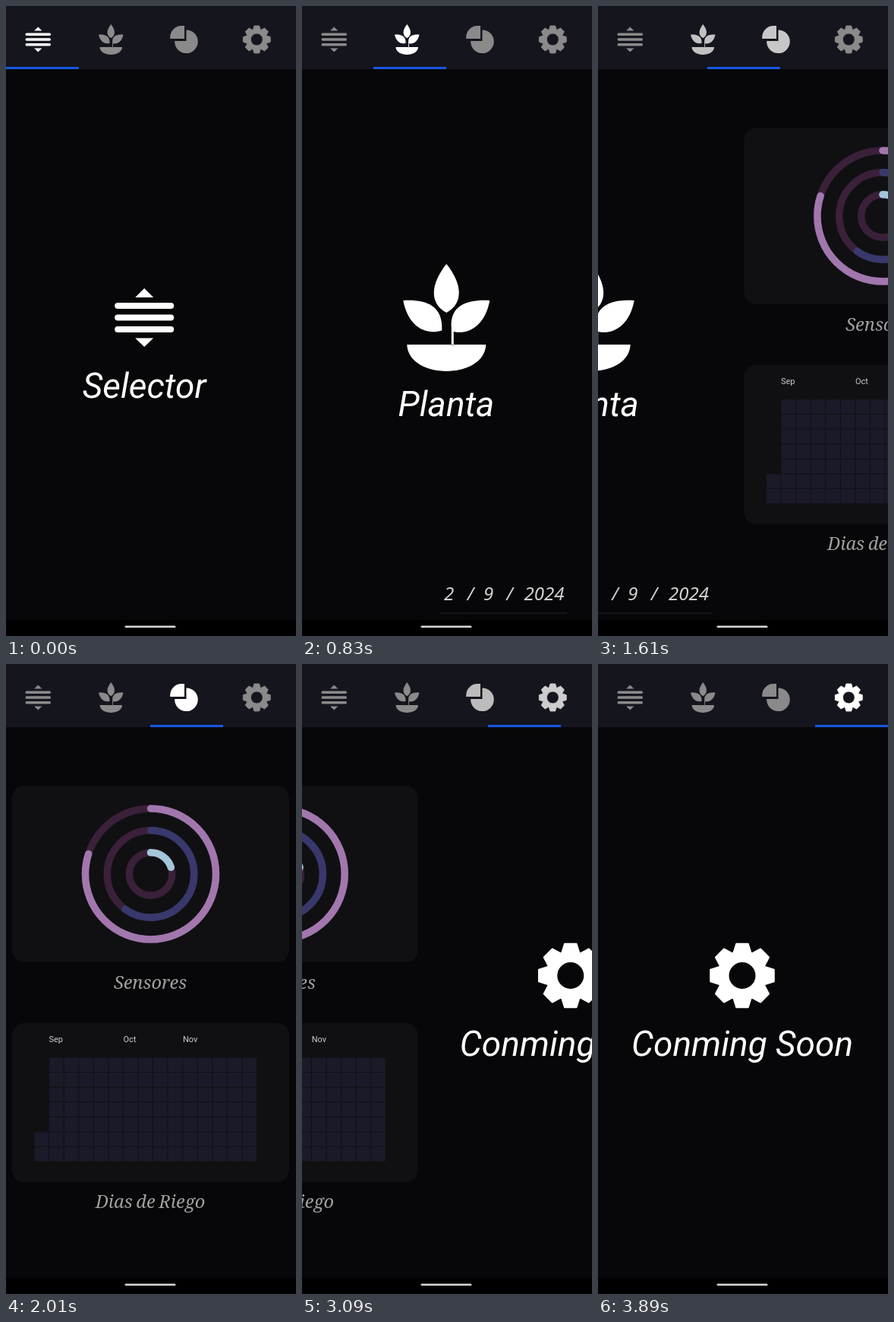
Animation of 382 by 828 pixels, one loop 3920 ms. Source, as an HTML page with a canvas:

```html
<!DOCTYPE html>
<html lang="es">
<head>
<meta charset="utf-8">
<title>Planta</title>
<style>
  html, body { margin: 0; width: 100%; height: 100%; overflow: hidden; background: #000; }
  canvas { display: block; width: 382px; height: 828px; }
</style>
</head>
<body>
<canvas id="stage"></canvas>
<script>
const W = 382, H = 828, LOOP = 3920;
const STRIDE = 384, TAB = 96, LEFT = -2, MID = 190;
const SWIPES = [-17, 1430.5, 2894], SWIPE_MS = 500;
const WHITE = '#fff', CARD = '#101013';
const MUTED = 138, ACTIVE = 255;

const canvas = document.getElementById('stage');
const ctx = canvas.getContext('2d');
const dpr = window.devicePixelRatio || 1;
canvas.width = W * dpr;
canvas.height = H * dpr;

const clamp = v => Math.max(0, Math.min(1, v));

// A flick: quick pick-up, then a long settle.
const flick = u => 1 - Math.pow(1 - Math.pow(clamp(u), 1.5), 3);
const pageAt = t => SWIPES.reduce((p, s) => p + flick((t - s) / SWIPE_MS), 0);

function rect(x, y, w, h, color, r = 0) {
  ctx.fillStyle = color;
  ctx.beginPath();
  ctx.roundRect(x, y, w, h, r);
  ctx.fill();
}

function text(str, x, y, font, color, align = 'center') {
  ctx.font = font;
  ctx.fillStyle = color;
  ctx.textAlign = align;
  ctx.fillText(str, x, y);
}

function icon(draw, x, y, scale, color) {
  ctx.save();
  ctx.translate(x, y);
  ctx.scale(scale, scale);
  ctx.fillStyle = ctx.strokeStyle = color;
  draw();
  ctx.restore();
}

function selector() {
  for (const y of [-15.6, 0, 15.6]) rect(-39, y - 4, 78, 8, ctx.fillStyle, 4);
  ctx.fill(new Path2D('M0-38.5L12-26.5H-12ZM0 38.5L12 27H-12Z'));
}

const PLANT = new Path2D(
  'M0-70.5C22-43 22-18 0-6.5C-22-18-22-43 0-70.5Z' +
  'M-57-22.5C-30-24-4-18-6 17C-29 24-51 10-57-22.5Z' +
  'M57-22.5C30-24 4-18 6.5 14V36H9.5V18.5C30 23 51 10 57-22.5Z' +
  'M-52 35.5H52C50 82-50 82-52 35.5Z');

const PIE = new Path2D(
  'M.5-18V-1H-18.3V-3A15 15 0 0 1-3.3-18Z' +
  'M3-12.5A15.3 15.3 0 1 1-12.3 2H3Z');

function gear() {
  ctx.beginPath();
  for (let k = 0; k < 8; k++) {
    for (const [deg, r] of [[-21, 32], [-10.5, 42.5], [10.5, 42.5], [21, 32]]) {
      const a = (k * 45 + deg - 90) * Math.PI / 180;
      ctx.lineTo(r * Math.cos(a), r * Math.sin(a));
    }
  }
  ctx.closePath();
  ctx.moveTo(18.5, 0);
  ctx.arc(0, 0, 18.5, 0, 2 * Math.PI, true);
  ctx.lineWidth = 2;
  ctx.lineJoin = 'round';
  ctx.fill();
  ctx.stroke();
}

const plant = () => ctx.fill(PLANT);
const pie = () => ctx.fill(PIE);

const title = (str, y) => text(str, MID, y, 'italic 46px Roboto, sans-serif', WHITE);

function caption(str, y) {
  ctx.wordSpacing = '-1.5px';
  text(str, MID, y, 'italic 23.6px "Noto Serif", serif', '#a0a0a0');
  ctx.wordSpacing = '0px';
}

function ring(r, share, color) {
  const top = -Math.PI / 2;
  const arc = (part, c) => {
    ctx.strokeStyle = c;
    ctx.beginPath();
    ctx.arc(190.5, 276, r, top, top + part * 2 * Math.PI);
    ctx.stroke();
  };
  ctx.lineWidth = 9.5;
  ctx.lineCap = 'round';
  arc(1, '#3a2038');
  arc(share, color);
}

function calendar() {
  const step = 19.57;
  for (let c = 0; c < 15; c++) {
    for (let r = c ? 0 : 5; r < 7; r++) {
      rect(37.5 + c * step, 517.5 + r * step, step - 1, step - 1, '#1b1a29');
    }
  }
  [['Sep', 56.5], ['Oct', 154.5], ['Nov', 233]].forEach(([m, x]) =>
    text(m, x, 497, '11px Roboto, sans-serif', '#cccccc', 'left'));
}

const pages = [
  () => {
    icon(selector, MID, 409.5, 1, WHITE);
    title('Selector', 515);
  },
  () => {
    icon(plant, 190.3, 409.5, 1, WHITE);
    title('Planta', 539);
    [['2', 193.5], ['/', 222], ['9', 245.5], ['/', 273.5], ['2024', 319]].forEach(([s, x]) =>
      text(s, x, 781, 'italic 500 24px "Noto Sans", sans-serif', '#d2d2d2'));
    rect(181, 797.5, 168, 1, '#25252b');
  },
  () => {
    rect(8, 160, 365, 232, CARD, 16);
    ring(86, 0.8, '#a177ad');
    ring(57.2, 0.6, '#38386c');
    ring(28.2, 0.2, '#a4c6da');
    caption('Sensores', 427);
    rect(8, 472, 365, 209, CARD, 16);
    calendar();
    caption('Dias de Riego', 715);
  },
  () => {
    icon(gear, MID, 409.5, 1, WHITE);
    title('Conming Soon', 515);
  }
];

const tabs = [
  [selector, 42.3, 44, 0.43],
  [plant, 138.3, 44, 0.285],
  [pie, 234.5, 44, 1],
  [gear, 330.3, 44, 0.43]
];

function draw(t) {
  const p = pageAt(t);
  ctx.setTransform(dpr, 0, 0, dpr, 0, 0);
  rect(0, 0, W, H, '#070709');

  pages.forEach((page, i) => {
    const x = (i - p) * STRIDE;
    if (Math.abs(x) >= STRIDE) return;
    ctx.save();
    ctx.translate(x, 0);
    page();
    ctx.restore();
  });

  rect(0, 0, W, 83, '#15151e');
  tabs.forEach(([shape, x, y, scale], i) => {
    const w = clamp(1 - Math.abs(p - i));
    const v = Math.round(MUTED + (ACTIVE - MUTED) * w);
    icon(shape, x, y, scale, `rgb(${v}, ${v}, ${v})`);
  });
  rect(LEFT + p * TAB, 80, TAB, 3, '#1757e2');

  rect(0, 807, W, 21, '#000');
  rect(156.5, 814.5, 67, 2.5, '#d8d8d8', 1.2);
}

const start = performance.now();
function tick() {
  draw((performance.now() - start) % LOOP);
  requestAnimationFrame(tick);
}
tick();
</script>
</body>
</html>
```
